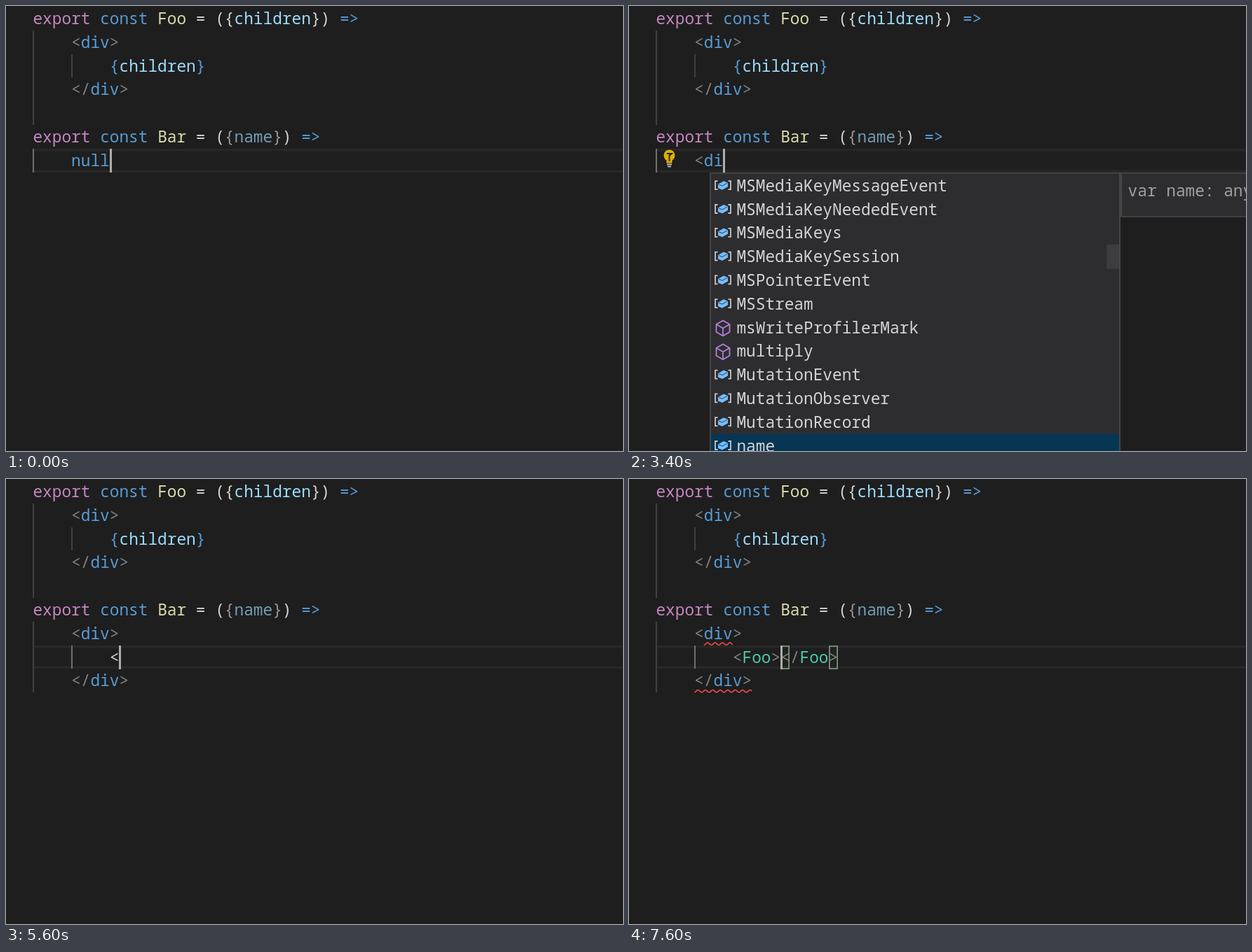
An HTML page with a canvas that plays this animation: 880x636 px, repeating every 8 s.

```html
<!DOCTYPE html>
<html lang="en">
<head>
<meta charset="utf-8">
<title>Editor typing</title>
<style>
html, body { margin: 0; width: 100%; height: 100%; overflow: hidden; background: #1e1e1e; }
canvas { display: block; width: 880px; height: 636px; }
</style>
</head>
<body>
<canvas id="stage" width="880" height="636"></canvas>
<script>
const ctx = document.getElementById('stage').getContext('2d');
const LOOP = 8000, X0 = 38.45, CW = 13.67, LH = 33.8, BASE = 25;
const FONT = `${CW / .6}px "Noto Sans Mono", "DejaVu Sans Mono", monospace`;
const COLORS = {
  p: '#c586c0', b: '#569cd6', y: '#dcdcaa', w: '#d4d4d4', c: '#9cdcfe',
  g: '#808080', t: '#4ec9b0', r: '#f44747', d: '#979797', n: '#729db3'
};
const colX = c => X0 + c * CW;
const rowY = r => 1 + r * LH;

// Code lines: runs split by "|", each led by a colour key.
const HEAD = [
  'pexport|b const|y Foo|w = ({|cchildren|w})|b =>',
  'g    <|bdiv|g>',
  'b        {|cchildren|b}',
  'g    </|bdiv|g>',
  '',
  'pexport|b const|y Bar|w = (|d{|nname|d}|w)|b =>'
];
const OPEN = 'g    <|bdiv|g>', CLOSE = 'g    </|bdiv|g>', BROKEN = 'r    </|bdiv|g>';
const nest = (inner, close = CLOSE) => [OPEN, inner, close];

// Suggestions: icon key, then the label with matched parts between "*".
const names = s => s.trim().split(/\s+/);
const ALL = names(`vMSMediaKeyMessageEvent vMSMediaKeyNeededEvent vMSMediaKeys vMSMediaKeySession
  vMSPointerEvent vMSStream mmsWriteProfilerMark mmultiply vMutationEvent vMutationObserver
  vMutationRecord vname`);
const DIV = names(`f*div* m*div*ide i*D*ata*Vi*ew m*di*spatchE*v*ent v*d*e*vi*cePixelRatio
  v*D*e*vi*ceAcceleration v*D*e*vi*ceLightEvent v*D*e*vi*ceMotionEvent v*D*e*vi*ceOrientationEvent
  v*D*e*vi*ceRotationRate vOES_standard_*d*er*iv*atives vMedia*D*e*vi*ceInfo`);
const F = names(`v*F*ile v*F*ileList v*F*ileReader i*F*loat32Array i*F*loat64Array v*F*ocusEvent
  v*F*ocusNavigationEvent v*F*oo v*F*ormData i*F*unction v*F*_OK`);
const FO = names(`v*Fo*cusEvent v*Fo*cusNavigationEvent v*Fo*o v*Fo*rmData i*F*l*o*at32Array
  i*F*l*o*at64Array i*F*uncti*o*n vBe*fo*reUnloadEvent vPer*fo*rmance vPer*fo*rmanceEntry
  vPer*fo*rmanceMark`);
const FOO = names(`v*Foo* v*Fo*cusNavigati*o*nEvent vBe*fo*reUnl*o*adEvent vPer*fo*rmanceNavigati*o*n
  vPer*fo*rmanceNavigati*o*nTiming vSVG*F*EComp*o*nentTransferElement vSVG*F*EC*o*nv*o*lveMatrixElement
  vSVG*F*EFl*oo*dElement vSVG*F*EM*o*rph*o*logyElement monbe*fo*reunl*o*ad vonbe*fo*reprint`);

const NAME_DOC = ['var name: any'];
const DIV_DOC = ['(JSX attribute)', 'div: React.Detai', 'LAttributes<HTML', 'ement>'];
const FILE_DOC = ['interface File', 'var File: {', 'new (fileBits:', 'tring, options', 'e;', 'prototype: File', '}'];
const FOO_DOC = ['const Foo: ({', 'children }: {', 'children: any', '}) => any'];
const list = (items, doc, sel, bar, alpha = .4) => ({ items, doc, sel, bar, alpha });

// Each step changes some fields of the state from its time on.
const STEPS = [
  [0, { code: ['b    null'], cur: [6, 8], on: true, guides: [[0, 6, 1, true]], marks: [] }],
  [480, { on: false }],
  [1040, { on: true }],
  [1480, { on: false }],
  [1960, { on: true }],
  [2440, { on: false }],
  [2560, { on: true, cur: [6, 4], sel: true, guides: [[0, 6, 1, false]] }],
  [2800, { bulb: true }],
  [3040, { code: ['w    <'], cur: [6, 5], sel: false, guides: [[0, 6, 1, true]] }],
  [3320, { code: ['g    <|bd'], cur: [6, 6] }],
  [3400, { code: ['g    <|bdi'], cur: [6, 7], popup: list(ALL, NAME_DOC, 11, [101, 136], .22) }],
  [3480, { code: ['g    <|bdiv'], cur: [6, 8], bulb: false, popup: list(DIV, null, 0, [0, 345]) }],
  [3560, { popup: list(DIV, DIV_DOC, 0, [0, 345]) }],
  [3800, { marks: [[6, 4, 8]] }],
  [3960, { on: false }],
  [4120, { code: [OPEN], cur: [6, 9], on: true, marks: [[6, 5, 8]] }],
  [4200, { popup: { loading: true } }],
  [4440, { popup: { items: ['k</div>'], sel: 0, single: true } }],
  [4560, { code: [OPEN + '|g</|bdiv|g>'], popup: null, boxes: [9, 14] }],
  [4640, { marks: [] }],
  [5040, { on: false }],
  [5120, { code: nest(''), cur: [7, 8], on: true, boxes: null, guides: [[0, 6, 3, true]] }],
  [5600, { code: nest('w        <'), cur: [7, 9], guides: [[0, 6, 3, false], [4, 7, 1, true]] }],
  [5720, { marks: [[6, 5, 8]] }],
  [5840, { marks: [[6, 5, 8], [8, 4, 10]] }],
  [5960, { popup: list(ALL, NAME_DOC, 11, [101, 136], .22) }],
  [6160, { code: nest('g        <|tF', BROKEN), cur: [7, 10], popup: list(F, FILE_DOC, 0, [0, 35]) }],
  [6240, { code: nest('g        <|tFo', BROKEN), cur: [7, 11] }],
  [6280, { popup: list(FO, FILE_DOC, 0, [0, 70]) }],
  [6360, { code: nest('g        <|tFoo', BROKEN), cur: [7, 12], popup: list(FOO, FOO_DOC, 0, [0, 250]) }],
  [6760, { marks: [[6, 5, 8], [7, 9, 12], [8, 4, 10]] }],
  [6920, { on: false }],
  [7160, { code: nest('g        <|tFoo|g>'), cur: [7, 13], on: true, popup: { loading: true } }],
  [7440, { marks: [[6, 5, 8], [8, 4, 10]], popup: { items: ['k</Foo>'], sel: 0, single: true } }],
  [7600, { code: nest('g        <|tFoo|g></|tFoo|g>'), popup: null, boxes: [13, 18] }]
];

function rect(x, y, w, h, color) {
  ctx.fillStyle = color;
  ctx.fillRect(x, y, w, h);
}

function text(str, x, y, color, bold) {
  ctx.font = (bold ? '700 ' : '500 ') + FONT;
  ctx.fillStyle = color;
  ctx.fillText(str, x, y);
}

function path(points, close) {
  ctx.beginPath();
  points.forEach(([x, y]) => ctx.lineTo(x, y));
  if (close) ctx.closePath();
}

function stroke(color, width) {
  ctx.strokeStyle = color;
  ctx.lineWidth = width;
  ctx.stroke();
}

function codeLine(line, row) {
  let col = 0;
  for (const run of line ? line.split('|') : []) {
    text(run.slice(1), colX(col), rowY(row) + BASE, COLORS[run[0]]);
    col += run.length - 1;
  }
}

function guide(col, row, count, active) {
  const top = Math.round(rowY(row));
  rect(col ? 93 : 38, top, 2, Math.round(rowY(row + count)) - top, active ? '#707070' : '#404040');
}

function lineHighlight(row) {
  const top = Math.round(rowY(row)), bottom = Math.round(rowY(row + 1));
  rect(40, top, 840, 3.5, '#282828');
  rect(40, bottom - 3.5, 840, 3.5, '#282828');
}

function squiggle([row, from, to]) {
  const y = rowY(row + 1) - 2, end = colX(to);
  ctx.beginPath();
  for (let x = colX(from); x <= end; x++) {
    ctx.lineTo(x, y + 1.7 * Math.cos((x - colX(from)) / 10.6 * 2 * Math.PI));
  }
  stroke('#f44747', 1.6);
}

function bulb() {
  ctx.beginPath();
  ctx.arc(57.5, 213.5, 8, 0, 7);
  ctx.fillStyle = '#ddb100';
  ctx.fill();
  rect(53.5, 218, 8, 6.5, '#ddb100');
  path([[54, 211], [61, 211], [57.5, 214], [57.5, 222]]);
  stroke('#1e1e1e', 1.8);
  rect(54, 225.5, 7, 1.8, '#c5c5c5');
  rect(55, 228.5, 5, 1.8, '#c5c5c5');
}

function outlineCube(x, y, w, h, color) {
  const q = h / 4;
  path([[x, y - h / 2], [x + w, y - q], [x + w, y + q], [x, y + h / 2], [x - w, y + q], [x - w, y - q]], true);
  stroke(color, 1.8);
  path([[x - w, y - q], [x, y], [x + w, y - q]]);
  stroke(color, 1.8);
  path([[x, y], [x, y + h / 2]]);
  stroke(color, 1.8);
}

// Solid box with its top face set off by a thin line.
function solidCube(outline, edge, back, width) {
  path(outline, true);
  ctx.fillStyle = '#75beff';
  ctx.fill();
  path(edge);
  stroke(back, width);
}

function icon(kind, y, back) {
  const x = 134;
  if (kind === 'v') {
    for (const s of [-1, 1]) {
      path([[x + s * 7.5, y - 6], [x + s * 11, y - 6], [x + s * 11, y + 6], [x + s * 7.5, y + 6]]);
      stroke('#c5c5c5', 1.8);
    }
    solidCube([[x - 7, y - 1.5], [x + 1, y - 6], [x + 7, y - 3.5], [x + 7, y + 2], [x - 1, y + 6.5], [x - 7, y + 4]],
      [[x - 6, y - 1], [x - 1, y + 1], [x + 6, y - 3]], back, .9);
  } else if (kind === 'm') {
    outlineCube(x, y + 1.5, 9.5, 22, '#b180d7');
  } else if (kind === 'f') {
    solidCube([[x, y - 11], [x + 12, y - 6], [x + 12, y + 5], [x, y + 11], [x - 12, y + 5], [x - 12, y - 6]],
      [[x - 11.5, y - 6], [x, y - 1], [x + 11.5, y - 6]], back, 1.5);
  } else if (kind === 'i') {
    ctx.beginPath();
    ctx.roundRect(x - 9, y - 7.5, 18, 15, 3);
    stroke('#c5c5c5', 1.9);
    rect(x - 5, y - 4, 10, 2, '#75beff');
    rect(x - 5, y + 1.5, 10, 2, '#75beff');
  } else {
    path([[x - 8, y + 8], [x + 2, y - 2]]);
    stroke('#c5c5c5', 4);
    ctx.beginPath();
    ctx.arc(x + 5, y - 5, 4.5, -.3, 4.4);
    stroke('#c5c5c5', 3);
  }
}

function frame(x, y, w, h) {
  rect(x, y, w, h, '#454545');
  rect(x + 2, y + 1.7, w - 4, h - 3.4, '#2d2d30');
}

function suggestion(item, y, selected) {
  const back = selected ? '#073655' : '#2d2d30';
  if (selected) rect(117, y, 582, LH, back);
  icon(item[0], y + 16.5, back);
  let x = 153.4;
  item.slice(1).split('*').forEach((part, i) => {
    text(part, x, y + BASE, i % 2 ? '#0097fb' : '#d4d4d4', i % 2);
    x += part.length * CW;
  });
}

function popup(p, row) {
  const top = Math.round(rowY(row + 1));
  const small = p.loading || p.single;
  frame(115, top, 586, small ? 34 : 420);
  if (p.loading) {
    text('Loading...', 124, top + BASE, '#d4d4d4');
    return;
  }
  ctx.save();
  ctx.beginPath();
  ctx.rect(117, top + 1.7, 582, small ? 30.6 : 416);
  ctx.clip();
  p.items.forEach((item, i) => suggestion(item, top + 1.7 + i * LH, i === p.sel));
  if (p.bar) rect(681.5, top + 1.7 + p.bar[0], 18, p.bar[1] - p.bar[0], `rgba(121,121,121,${p.alpha})`);
  ctx.restore();
  if (p.doc) {
    frame(701, top, 260, p.doc.length * LH + 30);
    p.doc.forEach((s, i) => text(s, 711.6, top + 33.6 + i * LH, '#a0a0a0'));
  }
}

function bracket(row, col) {
  const x = Math.round(colX(col)), y = Math.round(rowY(row));
  rect(x, y, 13, 34, 'rgba(0,100,0,.1)');
  ctx.strokeStyle = '#888';
  ctx.lineWidth = 1.8;
  ctx.strokeRect(x + .9, y + .9, 11.2, 32.2);
}

function draw(t) {
  const s = Object.assign({}, ...STEPS.filter(([at]) => at <= t).map(([, change]) => change));
  const [row, col] = s.cur;
  rect(0, 0, 880, 636, '#1e1e1e');
  if (s.sel) rect(colX(4), rowY(6), 4 * CW, LH, '#264f78');
  else lineHighlight(row);
  guide(0, 1, 4, false);
  guide(4, 2, 1, false);
  s.guides.forEach(g => guide(...g));
  if (s.boxes) s.boxes.forEach(c => bracket(row, c));
  HEAD.concat(s.code).forEach(codeLine);
  s.marks.forEach(squiggle);
  if (s.bulb) bulb();
  if (s.on) rect(Math.round(colX(col)), Math.round(rowY(row)), 3, 34, '#aeafad');
  if (s.popup) popup(s.popup, row);
}

const start = performance.now();
function tick() {
  draw((performance.now() - start) % LOOP);
  requestAnimationFrame(tick);
}
tick();
</script>
</body>
</html>
```
